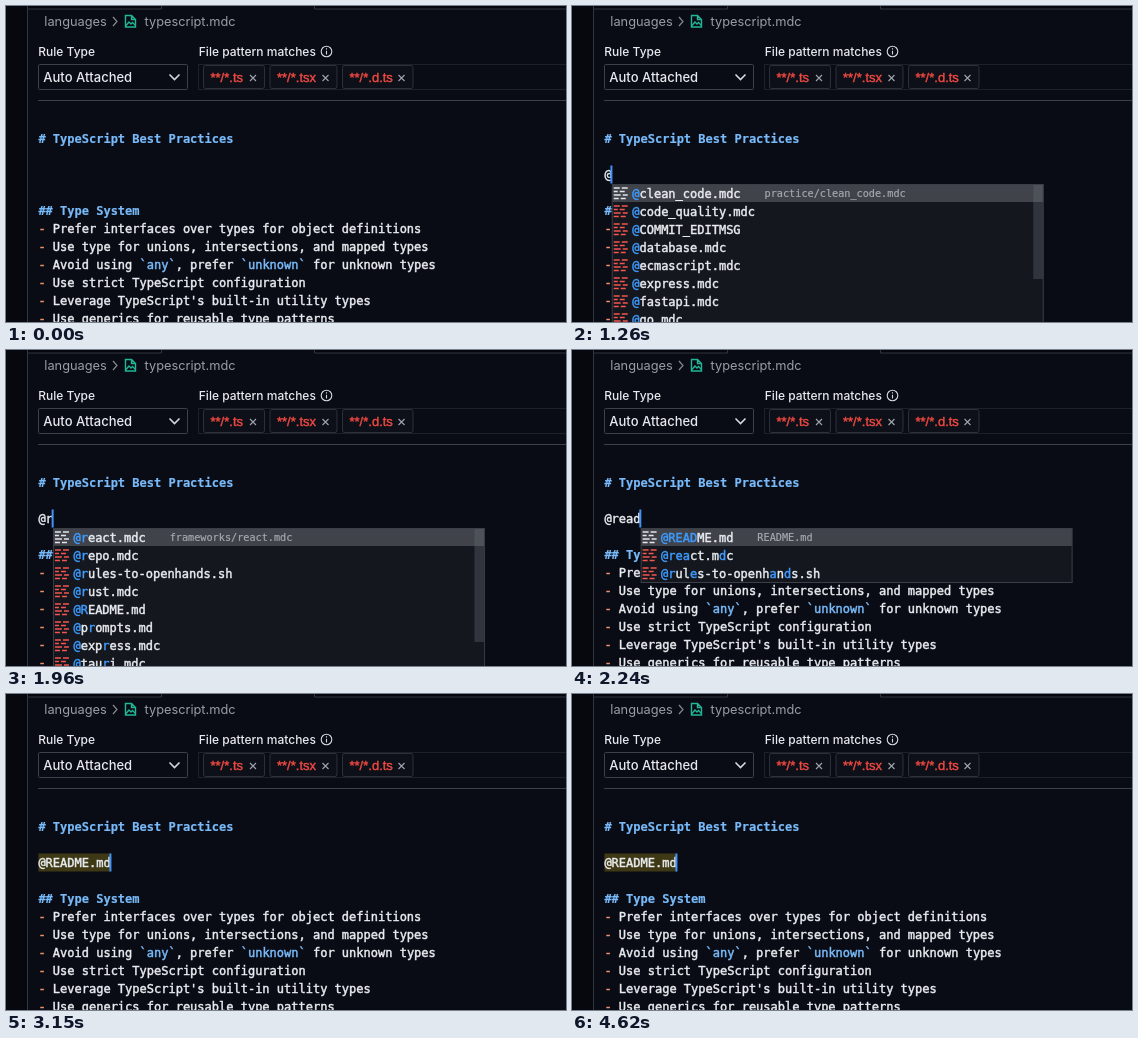
An HTML page that plays this animation: 560x316 px, repeating every 4.69 s.

```html
<!DOCTYPE html>
<html lang="en">
<head>
<meta charset="utf-8">
<style>
html, body { margin: 0; width: 100%; height: 100%; overflow: hidden; background: #0a0c15; }
svg { display: block; width: 560px; height: 316px; }
text { white-space: pre; }
.ui { font-family: Inter, sans-serif; }
.chip { font: 13px "Liberation Sans", sans-serif; fill: #f04a42; stroke: #f04a42; stroke-width: .4px; }
.code { font: 12px "DejaVu Sans Mono", monospace; fill: #e9ecf0; stroke: #e9ecf0; stroke-width: .45px; }
.head { font-weight: bold; fill: #79bbfa; stroke: #79bbfa; stroke-width: .2px; }
.tick { fill: #79bbfa; stroke: #79bbfa; }
.dash { fill: #ef9169; stroke: #ef9169; }
.hit { fill: #3f9bff; stroke: #3f9bff; }
.detail { font: 10.2px "DejaVu Sans Mono", monospace; fill: #a4a8af; stroke: #a4a8af; stroke-width: .2px; }
.line { fill: none; stroke: #3c4048; }
</style>
</head>
<body>
<svg viewBox="0 0 560 316">
  <rect width="560" height="316" fill="#0a0c15"/>
  <rect width="21" height="316" fill="#06080d"/>
  <path d="M22 0H155V3H22zM308 0H560V3H308z" fill="#05070c"/>
  <path class="line" d="M21.5 0V316M22 3H155.500V0M308.500 0V3H560" stroke-width=".8"/>

  <g class="ui" fill="#989da6" font-size="12.8">
    <text x="38.300" y="20">languages</text>
    <text x="138.500" y="20">typescript.mdc</text>
  </g>
  <path d="M107 11l4 4.500-4 4.500" fill="none" stroke="#858a93" stroke-width="1.2"/>
  <g fill="none" stroke="#22b596" stroke-width="1.400">
    <path d="M119.500 9.500h6l4 4v7.500h-10zM125.500 9.500v4h4"/>
    <path d="M120 19.500l3-3.500 2 2 1.500-1.500 3 3"/>
  </g>

  <g class="ui" fill="#e6e9ed" font-size="12" font-weight="500">
    <text x="32.300" y="50">Rule Type</text>
    <text x="192.800" y="50">File pattern matches</text>
    <text x="37.300" y="76" font-size="13">Auto Attached</text>
  </g>
  <g fill="none" stroke="#d5d8dd" stroke-width="1.100">
    <circle cx="320.500" cy="45.500" r="5.300"/>
    <path d="M320.500 44.700v3.800M320.500 42.200v1.300"/>
    <path d="M163.500 68.500l5 5 5-5" stroke-width="1.600"/>
  </g>
  <rect class="line" x="32.500" y="58.500" width="149" height="25" rx="1"/>
  <rect class="line" x="192.500" y="58.500" width="380" height="25" style="stroke:#1e2128"/>
  <g id="chips"></g>
  <path class="line" d="M32 94.500H560"/>
  <g id="document"></g>
  <g id="typing"></g>
</svg>
<script>
const LOOP = 4690, LEFT = 32.4, CHAR = 7.224, ROW = 18;
const $ = id => document.getElementById(id);
const baseline = line => 137 + line * ROW;
const code = (x, y, body, cls = "") => `<text class="code ${cls}" x="${x}" y="${y}">${body}</text>`;
const rect = (x, y, w, h, fill, extra = "") =>
  `<rect x="${x}" y="${y}" width="${w}" height="${h}" fill="${fill}" ${extra}/>`;

$("chips").innerHTML = [["**/*.ts", 197, 62], ["**/*.tsx", 263.5, 68], ["**/*.d.ts", 336, 71.5]]
  .map(([label, x, w]) =>
    rect(x + .5, 59.5, w - 1, 23, "#0d1018", 'rx="2" stroke="#2c3038"') +
    `<text class="chip" x="${x + 7.5}" y="76">${label}</text>` +
    `<path d="M${x + w - 15} 69l6 6m0-6l-6 6" stroke="#a0a4ac" stroke-width="1.1"/>`).join("");

const rules = [
  "Prefer interfaces over types for object definitions",
  "Use type for unions, intersections, and mapped types",
  "Avoid using `any`, prefer `unknown` for unknown types",
  "Use strict TypeScript configuration",
  "Leverage TypeScript's built-in utility types",
  "Use generics for reusable type patterns",
];
$("document").innerHTML =
  code(LEFT, baseline(0), "# TypeScript Best Practices", "head") +
  code(LEFT, baseline(4), "## Type System", "head") +
  rules.map((rule, i) => code(LEFT, baseline(5 + i),
    '<tspan class="dash">-</tspan> ' + rule.replace(/`\w+`/g, '<tspan class="tick">$&</tspan>'))).join("");

const folders = { "clean_code.mdc": "practice/", "react.mdc": "frameworks/" };
const suggestions = {
  "@": ["clean_code.mdc", "code_quality.mdc", "COMMIT_EDITMSG", "database.mdc",
    "ecmascript.mdc", "express.mdc", "fastapi.mdc", "go.mdc"],
  "@r": ["react.mdc", "repo.mdc", "rules-to-openhands.sh", "rust.mdc",
    "README.md", "prompts.md", "express.mdc", "tauri.mdc"],
  "@re": ["react.mdc", "repo.mdc", "README.md", "rules-to-openhands.sh", "express.mdc"],
  "@rea": ["react.mdc", "README.md", "rules-to-openhands.sh"],
  "@read": ["README.md", "react.mdc", "rules-to-openhands.sh"],
};

// Colours the letters of the query wherever they occur in order.
function highlight(name, query) {
  let next = 0;
  return [...name].map(c => {
    if (c.toLowerCase() !== query[next]) return c;
    next++;
    return `<tspan class="hit">${c}</tspan>`;
  }).join("");
}

const fileIcon = (x, y, color) =>
  `<path d="M${x} ${y}h6m2 0h6m-14 3.500h4m2 0h5m-11 3.500h7m2 0h5m-14 3.500h5m2 0h5" stroke="${color}" stroke-width="1.500"/>`;

function popup(query) {
  const names = suggestions[query], x = LEFT + query.length * CHAR + .6, top = 178, width = 431;
  const height = names.length * ROW;
  let out = rect(x, top, width, height, "#14171e") + rect(x, top, width, ROW, "#40434a");
  names.forEach((name, i) => {
    const y = top + i * ROW;
    out += fileIcon(x + 1.5, y + 4, i ? "#f2564f" : "#e4e6ea") +
      code(x + 20, y + 14, highlight("@" + name, query));
  });
  const detail = (folders[names[0]] || "") + names[0];
  out += `<text class="detail" x="${x + 44 + (names[0].length + 1) * CHAR}" y="191">${detail}</text>`;
  if (height > 138) out += rect(x + width - 10, top, 10, query === "@" ? 95 : 114, "#656a74", 'opacity=".35"');
  return out + rect(x, top + .5, width, height, "none", 'stroke="#3a3e46"');
}

// start time, typed text, caret shown, list shown
const timeline = [
  [0, "", 0, 0], [420, "", 1, 0], [840, "@", 1, 0], [980, "@", 1, 1], [1400, "@", 0, 1],
  [1820, "@r", 1, 1], [2030, "@re", 1, 1], [2100, "@rea", 1, 1], [2170, "@read", 1, 1],
  [2660, "@README.md", 1, 0], [3220, "@README.md", 0, 0], [3710, "@README.md", 1, 0],
  [4200, "@README.md", 0, 0], [4620, "@README.md", 1, 0],
];

let shown;
function draw() {
  const time = performance.now() % LOOP;
  const state = timeline.findLast(step => step[0] <= time);
  if (state !== shown) {
    shown = state;
    const [, text, caret, list] = state, end = LEFT + text.length * CHAR;
    $("typing").innerHTML =
      (text.endsWith(".md") ? rect(LEFT, 159.5, end - LEFT, 18, "#3e3914") : "") +
      code(LEFT, baseline(2), text) +
      (list ? popup(text) : "") +
      (caret ? rect(end - 1.2, 159.5, 2, 18, "#3f93f5") : "");
  }
  requestAnimationFrame(draw);
}
draw();
</script>
</body>
</html>
```
